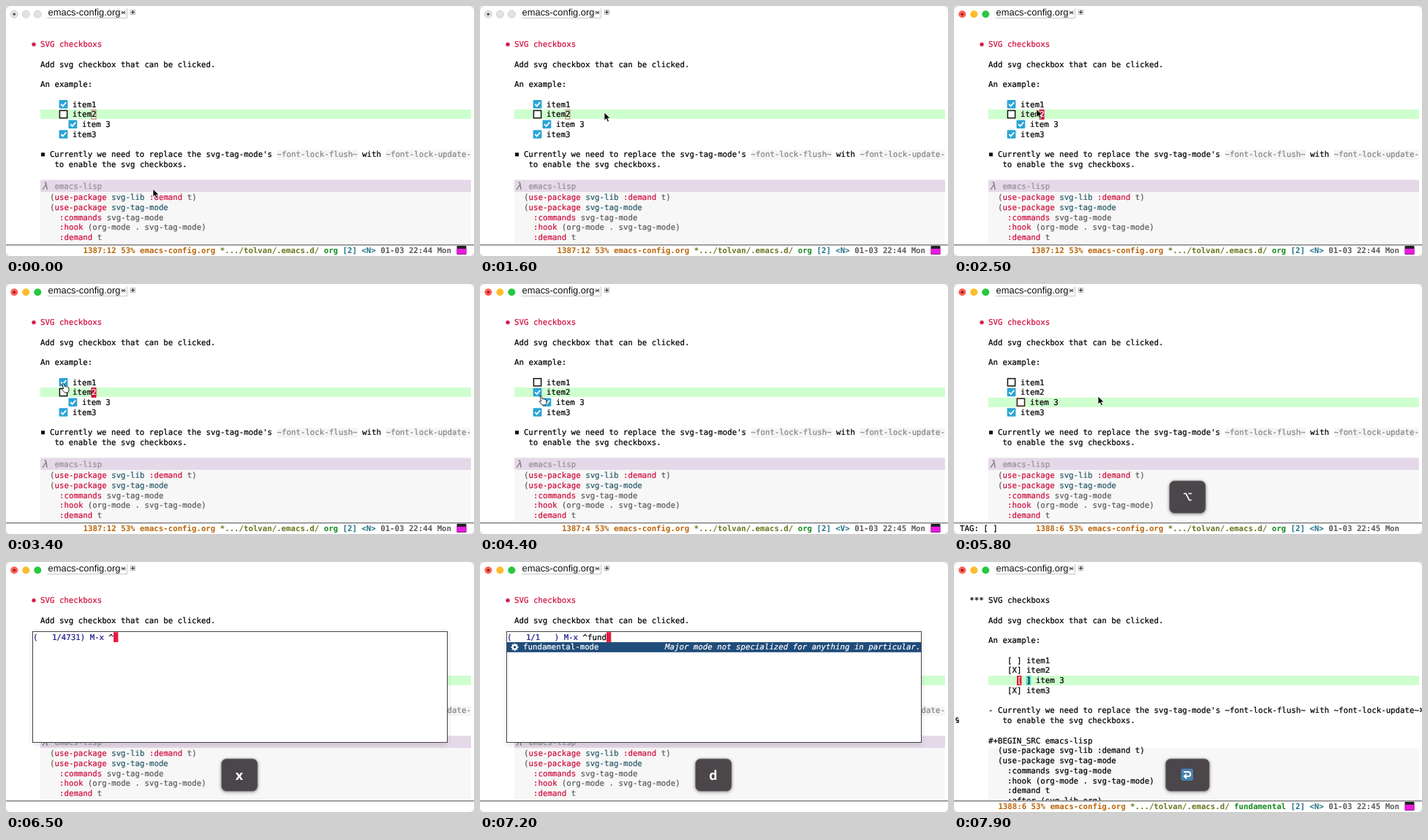
Recreate the animation shown at these times as an HTML page. Size 640 px wide and 343 px high, loop 8000 ms.

```html
<!DOCTYPE html>
<html lang="en">
<head>
<meta charset="utf-8">
<title>Clickable SVG checkboxes</title>
<style>
  html, body { margin: 0; width: 100%; height: 100%; overflow: hidden; background: #dedede; }
  svg { display: block; width: 640px; height: 343px; }
  text {
    font: 10.76px "DejaVu Sans Mono", "Liberation Mono", monospace;
    white-space: pre; text-rendering: geometricPrecision;
  }
  .tab { font: 12.9px "Liberation Sans", Arial, sans-serif; }
  .key { font: bold 18px "Open Sans", Inter, sans-serif; text-anchor: middle; }
  .b { font-weight: bold; font-size: 10.73px; }
  .i { font-style: italic; }
  .heavy { stroke: currentColor; stroke-width: .22px; }
</style>
</head>
<body>
<svg id="stage" viewBox="0 0 640 343"></svg>
<script>
const NS = "http://www.w3.org/2000/svg";
const CW = 6.475, ROW = 13.75, LEFT = 47, LOOP = 8000;
const RED = "#d0103f", TEAL = "#2b5d6b", GRAY = "#5c5c5c", BLACK = "#000", HL = "#ceffce";
const stage = document.getElementById("stage");
const base = n => 56.2 + n * ROW;

function el(parent, tag, attrs = {}, content) {
  const e = document.createElementNS(NS, tag);
  for (const k in attrs) e.setAttribute(k, attrs[k]);
  if (content !== undefined) e.textContent = content;
  parent.appendChild(e);
  return e;
}
const group = (parent = stage) => el(parent, "g");
const rect = (p, x, y, width, height, fill, more) => el(p, "rect", { x, y, width, height, fill, ...more });
const path = (p, d, more) => el(p, "path", { d, fill: "none", ...more });
const label = (p, x, y, s, fill = BLACK, cls = "heavy") =>
  el(p, "text", { x, y, fill, color: fill, class: cls }, s);
const show = (e, on) => e.setAttribute("display", on ? "inline" : "none");
const put = (e, x, y) => e.setAttribute("transform", `translate(${x} ${y})`);

// A line of coloured runs: [text, colour] pairs.
function runs(p, x, y, parts, cls = "") {
  const t = el(p, "text", { x, y, class: cls });
  return parts.map(([s, fill]) =>
    el(t, "tspan", { fill, color: fill, class: cls ? "" : "heavy" }, s));
}

// Last entry of a [time, value] table that has started.
function at(table, t) {
  let v = table[0][1];
  for (const [start, value] of table) if (t >= start) v = value;
  return v;
}

// Window and tab bar
rect(stage, 0, 0, 640, 343, "#fff", { rx: 7 });
const lights = [["#ff5f57", 11.3], ["#febc2e", 27.3], ["#28c840", 43.3]].map(([c, x]) =>
  ({ on: c, dot: el(stage, "circle", { cx: x, cy: 11.3, r: 5 }) }));
const pupil = el(stage, "circle", { cx: 11.3, cy: 11.3, r: 1.8 });
path(stage, "M56.5 16.5H165.5V3", { stroke: "#c8c8c8" });
label(stage, 57.6, 13, "emacs-config.org", "#111", "tab");
path(stage, "M158 6.5l5 5m0-5l-5 5M157.5 9h6", { stroke: "#333" });
rect(stage, 170.5, 5.5, 6, 6, "#eee", { stroke: "#bbb" });
path(stage, "M171 8.5h5M173.5 6v5", { stroke: "#222" });

const hl = rect(stage, LEFT, 0, 589, 13, HL);
rect(stage, LEFT, 255, 589, 72, "#f7f7f7");

// Prose shared by both modes
label(stage, LEFT, base(2), "Add svg checkbox that can be clicked.");
label(stage, LEFT, base(4), "An example:");
label(stage, 66.4, base(12), "to enable the svg checkboxs.");

// Org view
const org = group();
const star = group(org);
put(star, 38, 52.7);
for (let a = 0; a < 180; a += 45)
  path(star, "M-2.9 0H2.9", { stroke: RED, "stroke-width": 1.4, transform: `rotate(${a})` });
label(org, LEFT, base(0), "SVG checkboxs", RED);

const boxes = [["item1", 72.6], ["item2", 72.6], ["item 3", 85.5], ["item3", 72.6]].map(([name, x], i) => {
  const y = base(6 + i) - 9.6;
  const text = runs(org, x + 18.4, base(6 + i), [[name.slice(0, -1), BLACK], [name.slice(-1), BLACK]]);
  const off = rect(org, x + .8, y + .6, 10.2, 10.2, "#fff", { stroke: "#111", "stroke-width": 1.5 });
  const on = group(org);
  rect(on, x, y - .2, 11.8, 11.6, "#2aa4d6", { rx: 1.2 });
  path(on, `M${x + 2.6} ${y + 5.6}l2.5 2.6l4.5-5.2`, { stroke: "#fff", "stroke-width": 1.8 });
  return { off, on, lastChar: text[1] };
});
const caret = el(org, "rect", { x: 117, y: base(7) - 9.8, width: 6, height: 12.6 });
org.insertBefore(caret, org.firstChild);
const caretChar = boxes[1].lastChar;

rect(org, 48, base(11) - 6.2, 5, 5, "#111");
const quoteY = base(11);
rect(org, 371, quoteY - 10, 110.5, 13.5, "#f5f5f5");
rect(org, 520, quoteY - 10, 116, 13.5, "#f5f5f5");
runs(org, 59.9, quoteY, [
  ["Currently we need to replace the svg-tag-mode's ", BLACK], ["~font-lock-flush~", "#858585"],
  [" with ", BLACK], ["~font-lock-update-", "#858585"]]);

// Source block
rect(org, LEFT, 238.5, 589, 16.5, "#e5d8e8");
el(org, "text", { x: 49, y: 251.5, fill: "#777", style: "font-size:14px", class: "i" }, "λ");
label(org, 66.4, 251.2, "emacs-lisp", "#949096");

const code = [
  [60, [["(", GRAY], ["use-package", RED], [" ", GRAY], ["svg-lib", TEAL], [" ", GRAY], [":demand", RED], [" t)", GRAY]]],
  [60, [["(", GRAY], ["use-package", RED], [" ", GRAY], ["svg-tag-mode", TEAL]]],
  [73, [[":commands", RED], [" svg-tag-mode", GRAY]]],
  [73, [[":hook", RED], [" (org-mode . svg-tag-mode)", GRAY]]],
  [73, [[":demand", RED], [" t", GRAY]]],
  [73, [[":after", RED], [" (svg-lib org)", GRAY]]]
];
code.slice(0, 5).forEach(([x, parts], i) => runs(org, x, 266.2 + i * ROW, parts));

// Plain-text view
const plain = group();
label(plain, 21.2, base(0), "*** SVG checkboxs");
rect(plain, 86, base(8) - 10.3, 6.4, 13.3, "#e8173f");
rect(plain, 98.9, base(8) - 10.3, 6.4, 13.3, "#4fd6d0");
["[ ] item1", "[X] item2", "  ", "[X] item3"].forEach((s, i) =>
  label(plain, 73, base(6 + i), s));
runs(plain, 86, base(8), [["[", "#fff"], [" ] item 3", BLACK]]);
label(plain, LEFT, quoteY,
  "- Currently we need to replace the svg-tag-mode's ~font-lock-flush~ with ~font-lock-update~");
label(plain, LEFT, base(14), "#+BEGIN_SRC emacs-lisp");
code.forEach(([x, parts], i) =>
  label(plain, x, base(15 + i), parts.map(p => p[0]).join("")));
const wrap = { stroke: "#222", "stroke-width": 1.4 };
path(plain, "M6 214H3.5Q2 216 3.5 217.5H6M6 216V220H3", wrap);
path(plain, "M637 201H638.5Q639.8 203 638.5 205H637", wrap);

// Mode line
rect(stage, 0, 327, 640, 16, "#fff", { rx: 7 });
rect(stage, 0, 327, 640, 1.6, "#8a8a8a");
const modeline = group();
const [pos, , , major, , state, date] = runs(modeline, 609, 339, [
  ["", "#b8660a"], ["emacs-config.org ", "#b8660a"], ["*.../tolvan/.emacs.d/ ", "#69751f"],
  ["", "#138a1c"], ["[2] ", "#1f7186"], ["", "#1f7186"], ["", "#5a5a5a"]], "b");
pos.parentNode.setAttribute("text-anchor", "end");
const icon = group(modeline);
rect(icon, 616.5, 329, 13, 12, "#222", { rx: 1 });
rect(icon, 616.5, 333, 13, 7.5, "#e81be0");
const echo = label(modeline, 8, 339, "TAG: [ ]");

// Command prompt
const popup = group();
rect(popup, 36.5, 97, 567, 153, "#000", { opacity: .12, style: "filter:blur(4px)" });
rect(popup, 36.5, 95.5, 567, 152, "#fff", { stroke: "#444" });
const [counter, input] = runs(popup, 37, 106.6, [["", "#1b1b8c"], ["", BLACK]]);
const block = rect(popup, 0, 96.3, 6.3, 13.6, "#e8173f");
const choice = group(popup);
rect(choice, 37, 110, 566, 13.8, "#1f4c7a");
const gear = group(choice);
put(gear, 47.5, 116.8);
for (let a = 0; a < 180; a += 45)
  path(gear, "M-5 0H5", { stroke: "#fff", "stroke-width": 2, transform: `rotate(${a})` });
el(gear, "circle", { r: 2.7, fill: "#1f4c7a", stroke: "#fff", "stroke-width": 2 });
label(choice, 59, 120.4, "fundamental-mode", "#fff");
label(choice, 253, 120.4, "Major mode not specialized for anything in particular.", "#fff", "i heavy");

// Pressed key
const key = group();
const keyBox = rect(key, 0, 270, 0, 44.5, "#4b464a", {
  rx: 7, stroke: "#8a868a", "stroke-width": .8, style: "filter:drop-shadow(0 1px 2px #0006)" });
const keyText = label(key, 319, 298.5, "", "#fff", "key");
const option = path(key, "M314 287.5h3.2l4.6 9h3.2M320.5 287.5h4.5", { stroke: "#fff", "stroke-width": 1.7 });
const enter = group(key);
rect(enter, 310.5, 283.5, 16.5, 16.5, "#4782b0", { rx: 2.5 });
path(enter, "M314 288h6.5a3 3 0 0 1 0 6h-5M318 291l-3.2 3l3.2 3", { stroke: "#fff", "stroke-width": 1.8 });

// Pointers, tip at the origin
const ptr = group();
const arrow = path(ptr, "M0 0V11L2.6 8.7L4.5 13L6.5 12.1L4.6 8H8Z",
  { fill: "#000", stroke: "#fff", "stroke-width": .8 });
const hand = path(ptr,
  "M1 1Q2-.5 3 1L4.5 5Q5.5 4 6.3 5Q7.3 4.3 8 5.4Q9.5 5 9.8 7L10 10L8.8 13H4.2L.2 8.6Q0 7 2.6 8Z",
  { fill: "#fff", stroke: "#111", "stroke-width": .9 });

const FOCUS = 2000, CLICK1 = 3600, CLICK2 = 4200, CLICK3 = 5000;
const OPEN = 6300, ENTER = 7400, PLAIN = 7500;
const track = [
  [0, 201, 251], [300, 226, 226], [500, 226, 226], [800, 228, 158], [1200, 228, 158],
  [1400, 188, 149], [1600, 170, 146], [1800, 158, 145], [2000, 158, 145], [2800, 92, 140],
  [3000, 76, 136], [3800, 76, 136], [4100, 81, 153], [4500, 81, 153], [4800, 91, 161],
  [5200, 91, 161], [5700, 197, 154], [8000, 197, 154]
];
const typing = [[OPEN, ["4731", ""]], [6800, ["268", "f"]], [6900, ["17", "fu"]],
  [7000, ["4", "fun"]], [7100, ["1", "fund"]]];
const keys = [[0, ""], [5700, "opt"], [6200, "x"], [6800, "f"], [6900, "u"],
  [7000, "n"], [7100, "d"], [ENTER, "ret"]];
const places = [[0, "1387:12"], [CLICK1, "1386:4"], [CLICK2, "1387:4"], [CLICK3, "1388:6"]];
const lines = [[0, 7], [CLICK1, 6], [CLICK2, 7], [CLICK3, 8]];

function pointer(t) {
  const i = track.findIndex(p => p[0] > t);
  const [t0, x0, y0] = track[i - 1], [t1, x1, y1] = track[i];
  const u = (t - t0) / (t1 - t0), e = u * u * (3 - 2 * u);
  return [x0 + (x1 - x0) * e, y0 + (y1 - y0) * e];
}

function draw(time) {
  const t = Math.floor(time % LOOP / 100) * 100;
  const focused = t >= FOCUS, isPlain = t >= PLAIN, open = t >= OPEN && t < PLAIN;

  lights.forEach(({ on, dot }) => {
    dot.setAttribute("fill", focused ? on : "#e2e2e2");
    dot.setAttribute("stroke", focused ? "none" : "#cfcfcf");
  });
  pupil.setAttribute("fill", focused ? "#8c1a14" : "#555");

  hl.setAttribute("y", Math.round(base(at(lines, t)) - 10.3));
  const checked = [t < CLICK1, t >= CLICK2, t < CLICK3, true];
  boxes.forEach(({ on, off }, i) => {
    show(on, checked[i]);
    show(off, !checked[i]);
    off.setAttribute("stroke", i === 2 ? "#40141a" : "#111");
  });
  show(caret, t < CLICK1);
  caret.setAttribute("fill", focused ? RED : "none");
  caret.setAttribute("stroke", focused ? RED : "#c77b6b");
  const charColor = focused && t < CLICK1 ? "#fff" : BLACK;
  caretChar.setAttribute("fill", charColor);
  caretChar.setAttribute("color", charColor);

  show(org, !isPlain);
  show(plain, isPlain);

  const tagged = t >= CLICK3 && t < OPEN;
  show(modeline, !open);
  show(echo, tagged);
  show(icon, !tagged);
  pos.textContent = at(places, t) + " 53% ";
  major.textContent = isPlain ? "fundamental " : "org ";
  state.textContent = t >= CLICK2 && t < CLICK3 ? "<V> " : "<N> ";
  date.textContent = `01-03 22:${t < CLICK1 ? 44 : 45} Mon`;

  show(popup, open);
  const [count, word] = at(typing, t);
  counter.textContent = `(   1/${count.padEnd(4)}) M-x `;
  input.textContent = "^" + word;
  block.setAttribute("x", 37 + (17 + word.length) * CW);
  show(choice, word);

  const k = at(keys, t), width = k === "ret" ? 60 : 49.5;
  show(key, k);
  keyBox.setAttribute("x", 319.3 - width / 2);
  keyBox.setAttribute("width", width);
  keyText.textContent = k.length === 1 ? k : "";
  show(option, k === "opt");
  show(enter, k === "ret");

  const [x, y] = pointer(t), overBox = t >= 2800 && t < 5300;
  put(ptr, x, y);
  show(ptr, t < OPEN);
  show(arrow, !overBox);
  show(hand, overBox);
}

const start = performance.now();
function tick() {
  draw(performance.now() - start);
  requestAnimationFrame(tick);
}
tick();
</script>
</body>
</html>
```
